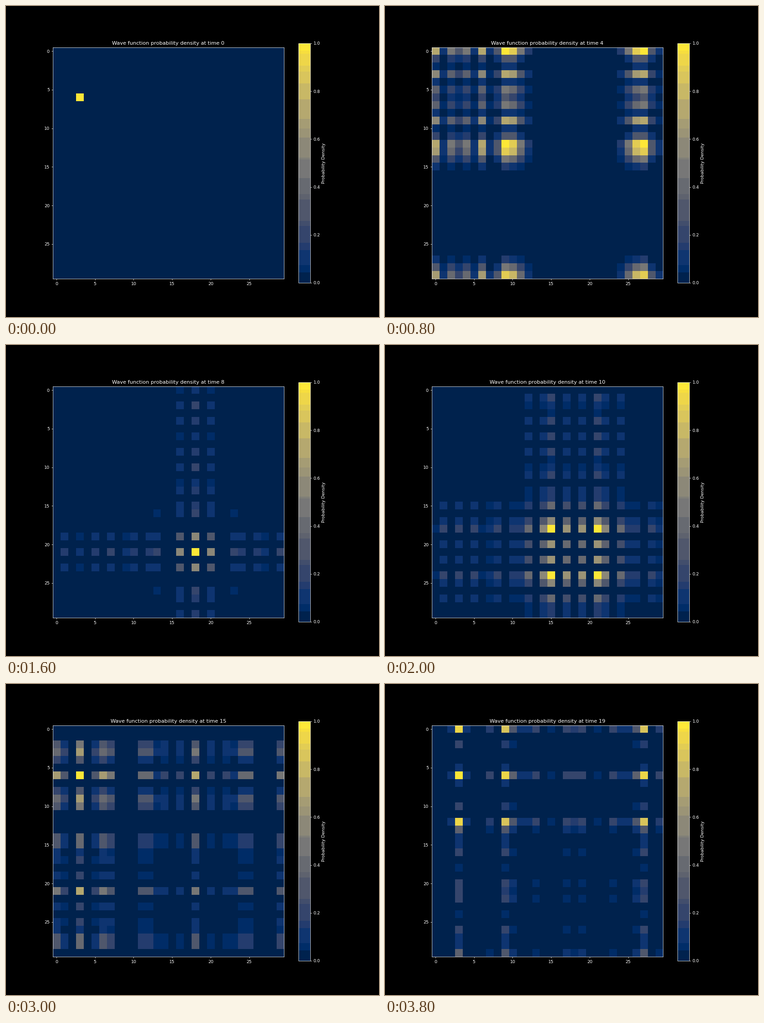
Recreate the animation shown at these times as a matplotlib script. Size 820x683 px, loop 4 s.

```python
import numpy as np
import matplotlib.pyplot as plt
from matplotlib.animation import FuncAnimation
from matplotlib.colors import ListedColormap

N = 30                # sites per side of the periodic lattice
START = (6, 3)        # row, column of the walker at time 0
STEPS = 20
INTERVAL = 200
DPI = 820 / 12

# Upper limits of the colour bands
BANDS = [0.044, 0.074, 0.137, 0.167, 0.238, 0.259, 0.348, 0.371, 0.439, 0.515,
         0.523, 0.605, 0.646, 0.684, 0.766, 0.833, 0.884, 0.905, 0.958, 0.970]


def banded_cividis():
    edges = np.array([0, *BANDS, 1])
    shades = (edges[:-1] + edges[1:]) / 2
    shades[0], shades[-1] = 0, 1
    levels = (np.arange(256) + 0.5) / 256
    return ListedColormap(plt.get_cmap("cividis")(shades[np.digitize(levels, BANDS)]))


def ring_density(t, start):
    """Density of a continuous-time quantum walk on a ring of N sites."""
    k = 2 * np.pi * np.arange(N) / N
    d = np.arange(N) - start
    psi = np.exp(1j * (np.outer(d, k) - 2 * t * np.cos(k))).mean(axis=1)
    return np.abs(psi) ** 2


def density(t):
    p = np.outer(ring_density(t, START[0]), ring_density(t, START[1]))
    return p / p.max()


plt.style.use("dark_background")
plt.rcParams["font.family"] = "DejaVu Sans"

fig, ax = plt.subplots(figsize=(820 / DPI, 683 / DPI), dpi=DPI)
image = ax.imshow(density(0), cmap=banded_cividis(), vmin=0, vmax=1,
                  interpolation="nearest")
fig.colorbar(image, ax=ax, label="Probability Density")
title = ax.set_title("")


def update(t):
    image.set_data(density(t))
    title.set_text(f"Wave function probability density at time {t}")
    return image, title


anim = FuncAnimation(fig, update, frames=STEPS, interval=INTERVAL,
                     repeat=True, repeat_delay=0)
plt.show()
```
